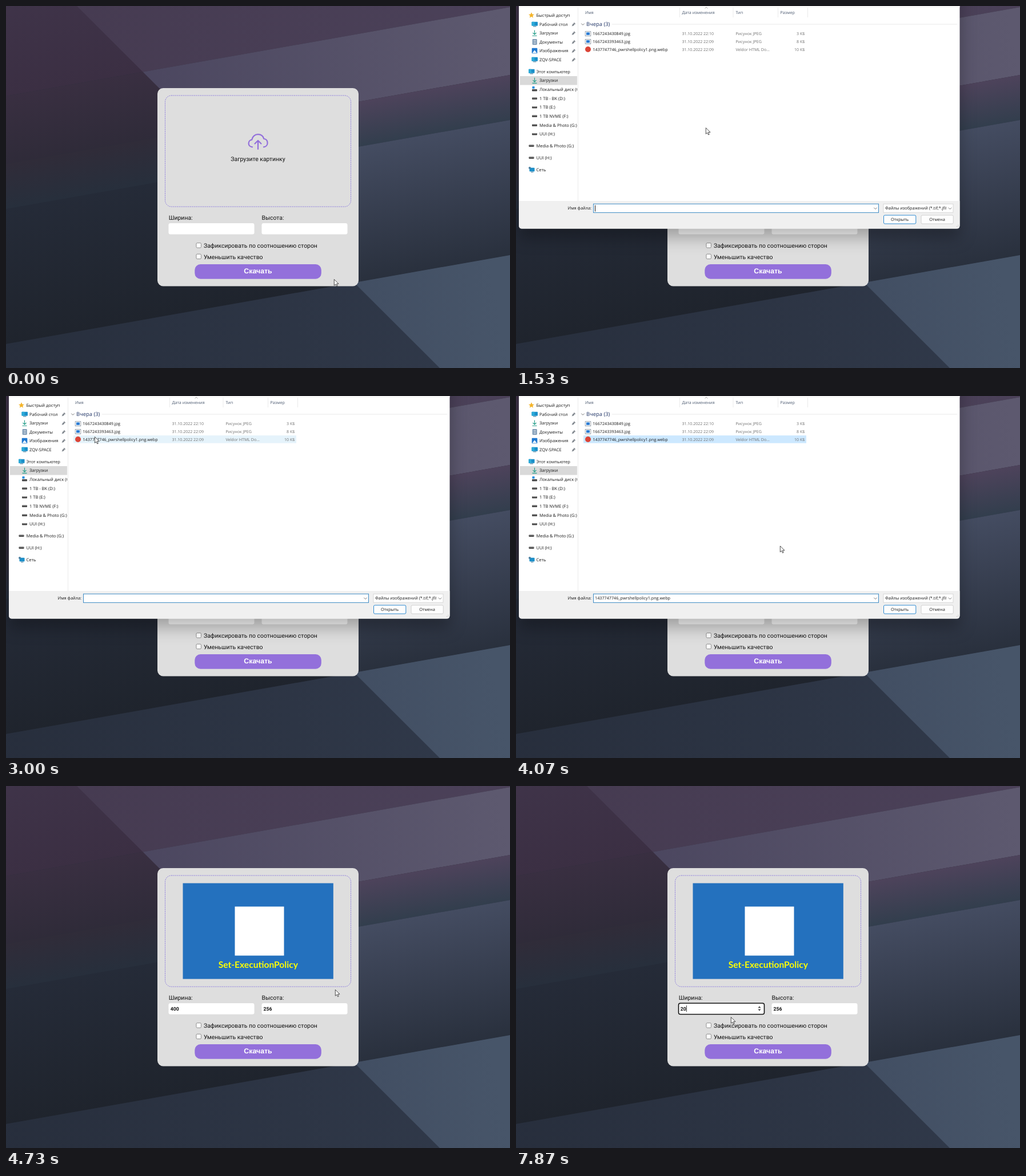
Recreate the animation shown at these times as an HTML page. Size 882x635 px, loop 8000 ms.

```html
<!DOCTYPE html>
<html lang="ru">
<head>
<meta charset="utf-8">
<title>Изменение размера картинки</title>
<style>
  html, body { margin: 0; height: 100%; overflow: hidden; background: #262c39; }
  svg { display: block; width: 100vw; height: 100vh; }
  text { white-space: pre; text-rendering: geometricPrecision; }
  .page { font-family: Roboto, sans-serif; fill: #111; }
  .ui { font-family: "Open Sans", "Noto Sans", sans-serif; fill: #1a1a1a; }
  .shadow { filter: drop-shadow(0 16px 14px rgba(0, 0, 0, .28)); }
</style>
</head>
<body>
<svg id="stage" viewBox="0 0 882 635"></svg>
<script>
const FILE = '1437747746_pwrshellpolicy1.png.webp';
const PURPLE = '#9370db';

const rect = (x, y, w, h, fill, more = '') =>
  `<rect x="${x}" y="${y}" width="${w}" height="${h}" fill="${fill}" ${more}/>`;
const path = (d, stroke, width = 1, more = '') =>
  `<path d="${d}" fill="none" stroke="${stroke}" stroke-width="${width}" ${more}/>`;
const shape = (d, fill, more = '') => `<path d="${d}" fill="${fill}" ${more}/>`;
// Text is placed by its left edge and the middle of its capitals.
const text = (x, cy, str, size, more = '') =>
  `<text x="${x}" y="${cy + size * .36}" font-size="${size}" ${more}>${str}</text>`;
const group = (id, content, more = '') => `<g id="${id}" ${more}>${content}</g>`;

// ---- Wallpaper: slanted bands, brighter on the right of a diagonal ----
const SLANT = 156;
function band(id, top, bottom, axis, from, to) {
  const h = bottom - top;
  const line = axis === 'v'
    ? [0, top, h * .17, top + h * .97]
    : [0, bottom, 882, bottom - SLANT];
  const [x1, y1, x2, y2] = line;
  return `<linearGradient id="${id}" gradientUnits="userSpaceOnUse" x1="${x1}" y1="${y1}" x2="${x2}" y2="${y2}">
    <stop stop-color="${from}"/><stop offset="1" stop-color="${to}"/></linearGradient>` +
    shape(`M0 ${top}L882 ${top - SLANT}V${bottom - SLANT}L0 ${bottom}Z`, `url(#${id})`);
}
const wallpaper =
  band('l1', -200, 158, 'v', '#443950', '#3b2f43') +
  band('l2', 158, 277, 'v', '#392f41', '#2f2b39') +
  band('l3', 277, 356, 'v', '#302c39', '#272f3c') +
  band('l4', 356, 593, 'v', '#252b38', '#1f242d') +
  band('l5', 593, 800, 'h', '#272e3c', '#313a4b') +
  '<clipPath id="bright"><path d="M124 0H882V635H759Z"/></clipPath><g clip-path="url(#bright)">' +
  band('r1', -200, 158, 'h', '#453a50', '#4b4159') +
  band('r2', 158, 277, 'h', '#443f59', '#5d596f') +
  band('r3', 277, 356, 'v', '#4d435b', '#323e4d') +
  band('r4', 356, 593, 'v', '#444c61', '#29303d') +
  band('r5', 593, 800, 'h', '#333c51', '#475569') + '</g>';

// ---- Upload card ----
const spinner = (id, x) => group(id, shape(`M${x - 2.6} 389.3l2.6-3 2.6 3zm0 2.2l2.6 3 2.6-3z`, '#444'));
const checkbox = (cy, label) =>
  rect(333, cy - 4.3, 8.4, 8.4, '#fff', 'rx="1.6" stroke="#767676" stroke-width=".8"') +
  text(346, cy + .5, label, 10.43);
const card = `<g class="page">` +
  rect(265, 144, 352, 347.5, '#dedede', 'rx="10"') +
  rect(278.5, 157, 325, 195, 'none', `rx="11" stroke="#8472dc" stroke-width=".9" stroke-dasharray="2 1.3"`) +
  group('prompt',
    path('M431 247.3C427 247 424.6 244.4 424.6 241.1C424.6 237.5 427 235 430.2 234.7C431 229 435.5 225.2 441 225.2C446 225.2 450 228.3 451.3 233C455.5 233.5 457.6 236.5 457.6 240.2C457.6 244 455 247 451 247.3M441 251V236M435.5 241.5L441 236L446.5 241.5',
      PURPLE, 2.2, 'stroke-linecap="round" stroke-linejoin="round"') +
    text(441, 268.5, 'Загрузите картинку', 10.43, 'text-anchor="middle"')) +
  group('picture',
    rect(309.5, 170.5, 263.3, 168, '#2471be') + rect(400.5, 211.5, 86, 86, '#fff') +
    text(441.3, 313.6, 'Set-ExecutionPolicy', 15.6, 'text-anchor="middle" font-family="Lato, sans-serif" font-weight="700" fill="#ff0"')) +
  text(284.7, 371.5, 'Ширина:', 10.43) + text(447.5, 371.5, 'Высота:', 10.43) +
  rect(284.5, 381, 150, 19.5, '#fff', 'rx="3.3" id="widthBox"') +
  rect(447.5, 381, 150, 19.5, '#fff', 'rx="3.3"') +
  rect(287.5, 384.5, 15.5, 11.5, '#3390ff', 'id="selection"') +
  text(287.7, 390.5, '', 8.7, 'id="widthValue" font-weight="700"') +
  text(450.5, 390.5, '', 8.7, 'id="heightValue" font-weight="700"') +
  rect(0, 385, .8, 11, '#000', 'id="inputCaret"') +
  spinner('widthSpinner', 426) + spinner('heightSpinner', 589) +
  checkbox(420, 'Зафиксировать по соотношению сторон') +
  checkbox(439.5, 'Уменьшить качество') +
  rect(330.3, 453, 221.5, 25.8, PURPLE, 'rx="10"') +
  text(441, 465, 'Скачать', 12.4, 'text-anchor="middle" font-family="Liberation Sans, sans-serif" font-weight="700" fill="#fff"') +
  '</g>';

// ---- File dialog ----
const icons = {
  star: shape('M0-5L1.5-1.6 5-1.3 2.3 1 3.2 4.6 0 2.7-3.2 4.6-2.3 1-5-1.3-1.5-1.6Z', '#f5b52b'),
  screen: rect(-5, -4.2, 10.5, 7, '#1b8fc9', 'rx=".8"') + rect(-5, -4.2, 5, 7, '#2ba9d8', 'rx=".8"') + rect(-2.5, 3.4, 5.5, 1, '#3a6f8f'),
  down: path('M0-5V2.5M-3-.5L0 2.5 3-.5M-4 4.7H4', '#1f9c88', 1.1),
  doc: rect(-3.8, -5, 8, 10, '#7b97b3', 'rx=".8"') + path('M-2-2.5H2.5M-2 0H2.5M-2 2.5H2.5', '#fff', .8),
  photo: rect(-4.8, -4.8, 9.6, 9.6, '#1f78d1', 'rx="1"') + shape('M-4 4L0-1 4 4Z', '#fff'),
  drive: rect(-4.5, -1.5, 9, 3.6, '#4a4a4a', 'rx=".8"') + rect(-4, -1.5, 8, 1, '#9a9a9a'),
  system: rect(-4.5, 0, 9, 3.6, '#4a4a4a', 'rx=".8"') + rect(-4, -5, 4, 4, '#1f8fe0'),
  net: rect(-3.5, -3.2, 9, 6.5, '#1b8fc9', 'rx=".8"') + rect(-5, -5, 4, 4, '#4c7fa0', 'rx="2"') + rect(-1, 3.8, 4.5, 1, '#3a6f8f'),
  image: rect(-4.8, -4, 9.6, 8, '#fff', 'stroke="#7d8b99" stroke-width=".8"') + rect(-3, -2.4, 6, 4.6, '#2b7cd3'),
  browser: '<circle r="5" fill="#db4437"/>',
  pin: shape('M.5-3.4L3.4-.5 1.5 0 .3 2.2-3.4 3.4-2-.2 0-1.5Z', '#858b92')
};
const icon = (name, x, y) => `<g transform="translate(${x} ${y})">${icons[name]}</g>`;

const places = [
  [16, 0, 'star', 'Быстрый доступ'],
  [32, 1, 'screen', 'Рабочий стол', 1], [47.5, 1, 'down', 'Загрузки', 1], [63, 1, 'doc', 'Документы', 1],
  [78.5, 1, 'photo', 'Изображения', 1], [94, 1, 'screen', 'ZQV-SPACE', 1],
  [115, 0, 'screen', 'Этот компьютер'],
  [130.7, 1, 'down', 'Загрузки'], [146, 1, 'system', 'Локальный диск (C:)'], [162, 1, 'drive', '1 TB - BK (D:)'],
  [177.5, 1, 'drive', '1 TB (E:)'], [193, 1, 'drive', '1 TB NVME (F:)'],
  [209, 1, 'drive', 'Media &amp; Photo (G:)'], [224.5, 1, 'drive', 'UUI (H:)'],
  [245, 0, 'drive', 'Media &amp; Photo (G:)'], [266, 0, 'drive', 'UUI (H:)'], [287, 0, 'net', 'Сеть']
];
const sidebar = rect(7, 123, 100, 15.6, '#d9d9d9') +
  '<clipPath id="side"><path d="M0 0H107V340H0Z"/></clipPath><g clip-path="url(#side)">' +
  places.map(([y, deep, kind, label, pinned]) =>
    icon(kind, 27 + deep * 5.5, y) + text(35.5 + deep * 5.5, y, label, 7.5) + (pinned ? icon('pin', 101, y) : '')).join('') +
  '</g>';

const ROWS = [48.7, 62.4, 76];
const files = [
  ['image', '1667243430849.jpg', '22:10', 'Рисунок JPEG', '3 КБ'],
  ['image', '1667243393463.jpg', '22:09', 'Рисунок JPEG', '8 КБ'],
  ['browser', FILE, '22:09', 'Veldor HTML Do...', '10 КБ']
];
const fileRow = ([kind, name, time, type, size], i) => {
  const y = ROWS[i], gray = 'fill="#707070"';
  return icon(kind, 126, y) + text(134.5, y, name, 7.2) +
    text(290.5, y, '31.10.2022 ' + time, 7, gray) + text(384.5, y, type, 7.1, gray) +
    text(505.5, y, size, 7, gray + ' text-anchor="end"');
};
const columns = [[121, 'Имя'], [290.5, 'Дата изменения'], [384.5, 'Тип'], [462.5, 'Размер']]
  .map(([x, label]) => text(x, 11.7, label, 7.2, 'fill="#4c5a70"')).join('');
const chevron = (x, y) => path(`M${x - 2.7} ${y - 1.3}l2.7 2.7 2.7-2.7`, '#555', .8);
const button = (x, label, border, id) =>
  rect(x, 367, 56.3, 15, '#fdfdfd', `rx="2" stroke="${border}" stroke-width="1" id="${id}"`) +
  text(x + 28, 374.5, label, 7.4, 'text-anchor="middle"');

const dialog = group('dialog',
  shape('M5-108H776.5V385q0 5.5-5.5 5.5H10.5q-5.5 0-5.5-5.5Z', '#fff', 'class="shadow"') +
  rect(5, -108, 771.5, 110.5, '#f5f5f5') +
  shape('M5 342H776.5V385q0 5.5-5.5 5.5H10.5q-5.5 0-5.5-5.5Z', '#f0f0f0') +
  text(17, -6.7, 'Упорядочить', 7.4) + shape('M69-8h5l-2.5 3z', '#333') + text(92, -6.7, 'Новая папка', 7.4) +
  path('M697-9h8m-8 2.5h8m-8 2.5h8', '#444', .9) + shape('M713-8h5l-2.5 3z', '#333') +
  rect(733, -10.5, 10, 8, '#fff', 'stroke="#456" stroke-width=".8"') + rect(739, -10.5, 4, 8, '#3a91d0') +
  '<circle cx="761" cy="-6.7" r="5.3" fill="#0f7fd6"/>' +
  text(761, -6.7, '?', 7.5, 'text-anchor="middle" style="fill:#fff"') +
  path('M286.5 3V20M380 3V20M458.5 3V20M510.5 3V20M108.5 3V342', '#e6e6e6', .8) +
  path('M330.5 4.5l2.5-2.5 2.5 2.5', '#888', .7) + columns + sidebar +
  text(442, 34.5, 'Выполняется...', 7.2, 'id="loading" text-anchor="middle" style="fill:#666"') +
  group('files',
    rect(118, 0, 390, 13.5, '#e5f3fb', 'id="hoverRow"') + rect(118, 69.2, 390, 13.5, '#cce8ff', 'id="chosenRow"') +
    chevron(117, 32) + text(123, 32, 'Вчера (3)', 9.4, 'style="fill:#1e3264"') +
    path('M168 32H772', '#e3e3e3', .8) + files.map(fileRow).join('')) +
  text(132, 354.7, 'Имя файла:', 7.4, 'text-anchor="end"') +
  rect(135.5, 347.2, 499, 15.2, '#fff', 'stroke="#3c8ac4" stroke-width="1"') + chevron(629, 355) +
  rect(136.5, 349, 134, 12, '#0078d7', 'id="nameSelection"') +
  text(138, 354.7, '', 7.24, 'id="fileName"') + rect(138, 349.5, .9, 11, '#000', 'id="nameCaret"') +
  rect(643, 347.2, 122, 15, '#fff', 'stroke="#d0d0d0" stroke-width=".8"') +
  '<clipPath id="kind"><path d="M643 345H753V365H643Z"/></clipPath>' +
  `<g clip-path="url(#kind)">${text(646, 354.7, 'Файлы изображений (*.tif;*.jfif', 7.3)}</g>` + chevron(759.5, 355) +
  button(643.5, 'Открыть', '#2f8ad0', 'openButton') + button(709, 'Отмена', '#d0d0d0', 'cancelButton') +
  path('M774 384v.9m0 1.4v.9m-2.6-.9v.9', '#aaa', 1),
  'class="ui"');

// ---- Pointers ----
const outline = 'stroke="#222" stroke-width=".8" stroke-linejoin="round"';
const pointer = group('pointer',
  group('arrow', shape('M.3.5V11.3L2.8 9 4.5 12.8 6.2 12 4.5 8.3H8Z', '#fff', outline)) +
  group('hand', shape('M-1 .5Q0-.6 1 .5V5L5.5 6Q6.6 6.4 6.4 8L5.5 13H-1.5L-4.5 8.6Q-4.4 7-3 7.6L-1 9Z', '#fff', outline)) +
  group('beam', path('M-2.5-7H-.6L0-6.4.6-7H2.5M0-6.4V6.4M-2.5 7H-.6L0 6.4.6 7H2.5', '#222', .9)));

document.getElementById('stage').innerHTML = wallpaper + card + dialog + pointer;

// ---- Motion ----
const $ = id => document.getElementById(id);
const show = (id, on) => { $(id).style.display = on ? '' : 'none'; };
const clamp = v => Math.min(1, Math.max(0, v));
const LOOP = 8000, STEP = 1000 / 15;

// time, x, y
const route = [
  [0, 574, 479], [60, 574, 479], [61, 491, 384], [210, 491, 384], [600, 448, 290], [930, 437, 239],
  [1060, 436, 242], [1200, 436, 242], [1530, 333, 214], [1870, 230, 130], [2250, 172, 50], [2700, 158, 61],
  [2930, 155, 71], [3630, 156, 72], [4000, 420, 240], [4400, 672, 375], [4600, 672, 375], [4730, 576, 357],
  [5330, 577, 325], [5650, 520, 163], [6150, 306, 389], [6300, 306, 389], [6600, 255, 390],
  [6930, 376, 405], [LOOP, 376, 405]
];
function pointerAt(t) {
  const i = route.findIndex(p => p[0] > t);
  const [t0, x0, y0] = route[i - 1], [t1, x1, y1] = route[i];
  const k = (t - t0) / (t1 - t0);
  return [x0 + (x1 - x0) * k, y0 + (y1 - y0) * k];
}
const inside = (x, y, left, top, right, bottom) => x >= left && x <= right && y >= top && y <= bottom;

function drawDialog(t, x, y) {
  const opening = clamp((t - 1030) / 240), closing = clamp((t - 4530) / 167);
  const open = t > 1050 && closing < 1;
  show('dialog', open);
  if (!open) return false;

  const scale = closing ? 1 - .052 * closing : 1 - .2 * (1 - opening) ** 2;
  const cx = closing ? 368 : 353;
  $('dialog').setAttribute('transform', `translate(${cx} 141) scale(${scale}) translate(${-cx} -141)`);
  $('dialog').setAttribute('opacity', closing ? 1 - closing : Math.min(1, opening * 1.68));

  const loaded = t > 1250, chosen = t > 3300, confirmed = t > 4450;
  show('loading', !loaded);
  show('files', loaded);
  const row = inside(x, y, 118, 42, 508, 82.6) ? Math.floor((y - 42) / 13.6) : -1;
  show('hoverRow', row >= 0);
  if (row >= 0) $('hoverRow').setAttribute('y', ROWS[row] - 6.8);
  show('chosenRow', chosen);
  $('chosenRow').setAttribute('fill', confirmed ? '#d9d9d9' : '#cce8ff');
  $('fileName').textContent = chosen ? FILE : '';
  $('fileName').style.fill = confirmed ? '#fff' : '';
  show('nameSelection', confirmed);
  show('nameCaret', !chosen && Math.floor((t - 1050) / 530) % 2 === 0);
  const hovered = inside(x, y, 643, 367, 700, 382);
  $('openButton').setAttribute('fill', hovered ? '#e8f2fa' : '#fdfdfd');
  $('openButton').setAttribute('stroke', confirmed ? 'none' : '#2f8ad0');
  return true;
}

function drawCard(t, overWidth, overHeight) {
  const filled = t > 4520, focused = t > 6180, typed = t > 7720;
  const width = !filled ? '' : !typed ? '400' : t > 7860 ? '20' : '2';
  show('prompt', !filled);
  show('picture', filled);
  $('widthValue').textContent = width;
  $('heightValue').textContent = filled ? '256' : '';
  const selected = t > 6450 && !typed;
  show('selection', selected);
  $('widthValue').setAttribute('fill', selected ? '#fff' : '#111');
  $('widthBox').setAttribute('stroke', focused ? '#101010' : 'none');
  $('widthBox').setAttribute('stroke-width', 1.6);
  show('inputCaret', focused && !selected);
  $('inputCaret').setAttribute('x', 287.9 + width.length * 5);
  show('widthSpinner', focused || overWidth);
  show('heightSpinner', overHeight);
}

function draw(now) {
  const t = Math.floor((now % LOOP + 4) / STEP) * STEP % LOOP;
  const [x, y] = pointerAt(t);
  const open = drawDialog(t, x, y);
  const overWidth = !open && inside(x, y, 284, 381, 435, 401);
  const overHeight = !open && inside(x, y, 447, 381, 598, 401);
  drawCard(t, overWidth, overHeight);

  const dragging = t > 6180 && t < 6640;
  const kind = overWidth || overHeight || dragging ? 'beam'
    : !open && inside(x, y, 278, 157, 604, 352) ? 'hand' : 'arrow';
  for (const name of ['arrow', 'hand', 'beam']) show(name, name === kind);
  $('pointer').setAttribute('transform', `translate(${x} ${y})`);
}

const start = performance.now();
function loop() {
  draw(performance.now() - start);
  requestAnimationFrame(loop);
}
loop();
</script>
</body>
</html>
```
